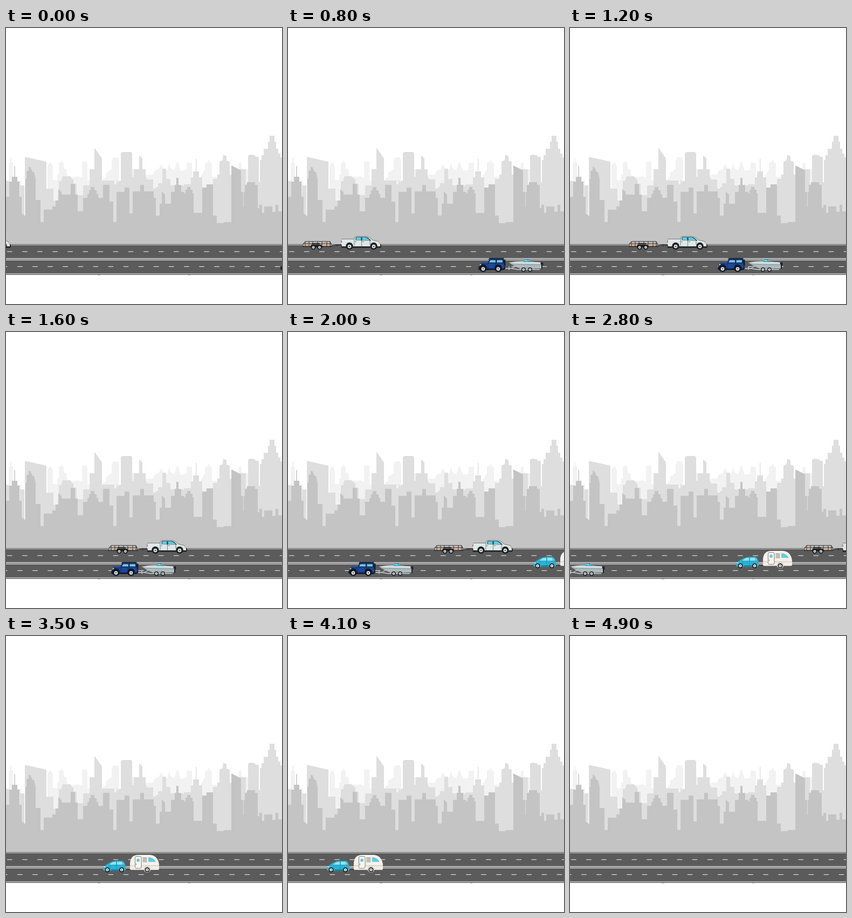
These frames come from a looping animation (512 px wide and 512 px high, 5 s). An HTML page with a canvas:

```html
<!DOCTYPE html>
<html lang="en">
<head>
<meta charset="utf-8">
<title>City traffic</title>
<style>
html, body { margin: 0; width: 100%; height: 100%; overflow: hidden; background: #fff; }
canvas { display: block; width: 100vmin; height: 100vmin; }
</style>
</head>
<body>
<canvas id="stage" width="512" height="512"></canvas>
<script>
const ctx = document.getElementById('stage').getContext('2d');
const LOOP = 5000, STEP = 100;

function fill(color, d) {
  ctx.fillStyle = color;
  ctx.fill(new Path2D(d));
}
function stroke(color, width, d) {
  ctx.strokeStyle = color;
  ctx.lineWidth = width;
  ctx.stroke(new Path2D(d));
}
function rect(color, x, y, w, h) {
  ctx.fillStyle = color;
  ctx.fillRect(x, y, w, h);
}
function disc(color, x, y, r) {
  ctx.fillStyle = color;
  ctx.beginPath();
  ctx.arc(x, y, r, 0, Math.PI * 2);
  ctx.fill();
}
function wheel(x, y, r, rim = '#e4e8ea', hub = '#555c61') {
  disc('#15191c', x, y, r);
  disc(rim, x, y, r * 0.62);
  disc(hub, x, y, r * 0.25);
}

// City outlines, from the back layer to the front one
const far = ['M0 401V283H5V250H7.5V241H10V249H13V283H28V401Z',
  'M77 401V256L81 250H84L87 258V282H95V272H98V250H101L103 245 105 250H107V260L112 262 114 276H131L134 275 141 278V248H151V283H156V401Z',
  'M178 401V283L186 275V268L196 262V246L199 240H207L210 246V283H234V262H238V272H273L275 265 283 262 288 252 291 260 299 264 303 250 305 260 312 264 318 246 322 258 324 265 335 263V250H345V401Z',
  'M362 401V275L369 262V250L374 249 376 243 379 250 382 251V276H393V401ZM418 401V262H431L432 250H436L438 262H449V401Z'];
const mid = ['M0 401V284H6V401ZM26 401V292H34V349H35V239L75 248V298H88V320H98V284H102L105 275H119L122 280 125 281V289H131V310H143V292H155V262H164V222L178 242V283H201V290H205V281L209 287V284H213V233L216 230H232L234 233V276H237V262H247V236L253 242V262H259V276L262 281H273V298H278V295H282V288H290V261H297V280H305V292H330V401Z',
  'M330 401V290H343V277H347V266H352V243H353.4V266H358V277H364V296H384V280H392V272H396V248L402 245 403 235 409 238V246L415 248V272H418V401Z',
  'M434 401V262H445V290H449V237L453 235 462 236 463 239H469V286H471V245H474V236H478V224H486V211H489V200H498V211H501V224H505V233H509V240H512V401Z'];
const near = ['M0 401V313H6V285H11V276H15.3V256H16.8V276H21V285H25V313H29V344L36 349V280H38V265H41.500L42.500 257 46 259 49 267H52L55 280V319H64V360H70V337H86V331H92V320H97V299L103 304V309H120V289H128V309H133V340H143V315H151V308H154V301H157V295H164V301H168V308H171V315H180V291H192V322H199V360H205V304H220V296H229V344H235V401Z',
  'M235 401V303H249V291H256V303H274V315H278V348H285V326H289V303L295 309V326H306V304H313V291H316V278H320V291H325V304H331V307H333V300H336V295H342V300H346V307H348V343H364V296H372V290H384V348H391V362H404V360H418V255L436 264V304H440V332H441V305H443V291H447V286H462V291H467V334H470V328H475V343H479V331H494V341H500V328H505V340H512V401Z'];

function city() {
  far.forEach(d => fill('#f2f2f2', d));
  mid.forEach(d => fill('#dedede', d));
  near.forEach(d => fill('#c4c4c4', d));
}

function lane(y, h, dashX, dashY) {
  rect('#5b5b5b', 0, y, 512, h);
  for (let x = dashX; x < 512; x += 28.1) rect('#e8e8e8', x, dashY, 9.5, 1.1);
}
function road() {
  rect('#fff', 0, 401, 512, 57);
  rect('#5b5b5b', 0, 401, 512, 1.3);
  lane(403, 24, 2, 414.3);
  rect('#5b5b5b', 0, 428, 512, 1.6);
  lane(430.8, 24.7, -7, 442);
  rect('#5b5b5b', 0, 456.5, 512, 1.5);
  rect('#8a8a8a', 170, 458, 5, 0.5);
  rect('#8a8a8a', 338, 458, 4, 0.5);
}

function truck() {
  // flat trailer
  rect('#d8b499', 3, 400, 50, 5);
  stroke('#34302e', 1, 'M1 402L6 396H52L55 402M6 396V405M13 396V405M20 396V405M29 396V405M37 396V405M46 396V405M52 396V405M2 400H54');
  rect('#292a2b', 1, 404.5, 54, 1.6);
  rect('#292a2b', 18, 399, 15, 2.5);
  fill('#222', 'M15 407L17 402H36L39 407Z');
  wheel(21, 407, 4);
  wheel(32.5, 407, 4);
  stroke('#303437', 1.4, 'M55 404L64 402.500H75M65 401V405');
  // pickup
  fill('#252b2e', 'M72 401H146L147.500 404 146 408H73Z');
  fill('#dfe8e8', 'M73 393L74 391.500H97L98 388 100 386.700H118Q124 387 131 393.500L142 396 145 401V405H74L73 401Z');
  stroke('#4a5255', 0.7, 'M73 393L74 391.500H97L98 388 100 386.700H118Q124 387 131 393.500L142 396 145 401M97 392V404M110.500 388V405M126 394V402');
  fill('#273238', 'M99.500 394V389L101 387.700H118Q122 388 128.500 394.500Z');
  fill('#62cce4', 'M100.500 393.700V389.500L102 388.500H109.500V393.700ZM111.500 393.700V388.500H117Q121 389 126 394Z');
  rect('#535d60', 98, 396, 3, 0.8);
  rect('#535d60', 112, 396, 3, 0.8);
  rect('#c04b43', 72.5, 394, 1.3, 4);
  rect('#f3d38b', 141, 398, 3, 2);
  disc('#202629', 88, 404.5, 6.7);
  disc('#202629', 133, 404.5, 6.7);
  wheel(88, 405.2, 5.5);
  wheel(133, 405.2, 5.5);
}

function jeep() {
  // boat and its trailer
  stroke('#cbd3d6', 1.3, 'M50 446H62L73 448H114M57 442V449M62 446L69 442');
  fill('#aebbbf', 'M57 435Q70 432 84 432.500L119 435 118 446 79 446.500Q67 443 57 435Z');
  fill('#d2dcde', 'M57 435Q70 432 84 432.500L119 435 118.500 438 66 437.500Z');
  stroke('#718083', 0.7, 'M60 438L118 439.500M57 435Q70 432 84 432.500');
  fill('#35a9bd', 'M83 432.500L90 428.500 92 429 98 434H85Z');
  fill('#80dce7', 'M86 432L90 429.500 92 432.500Z');
  fill('#1d2328', 'M115 435L120 434.500 120.500 439 119 441V447H117V440Z');
  fill('#9caaae', 'M77 447Q80 442 90 443.500 98 442 103 447Z');
  wheel(84, 448.2, 4);
  wheel(96, 448.2, 4);
  // off-roader
  rect('#171c24', 47, 430, 3.5, 11);
  fill('#121d34', 'M1 442H50V447L47 449H2L0 447Z');
  fill('#1d489b', 'M2 446L3 437 6 435H17L21 428H47L48 446Z');
  fill('#14264b', 'M19 428.500L21 426.800H47L48 429.500H19Z');
  fill('#142846', 'M18 435.500L21 429.500H47V436H18Z');
  fill('#75bee2', 'M20 435L22.500 430.500H32V435ZM34.500 430.500H45V435H34.500Z');
  stroke('#102956', 0.8, 'M18 436H47M18 436V446M33 430V446M4 438H17');
  rect('#14264b', 29, 438, 3, 0.8);
  disc('#f0cf75', 4, 439, 1.3);
  disc('#10182a', 9, 445.5, 7);
  disc('#10182a', 37, 445.5, 7);
  wheel(9, 446.8, 5.4);
  wheel(37, 446.8, 5.4);
}

function caravan() {
  rect('#3c4247', 40, 432.4, 13, 1.7);
  // hatchback
  fill('#27b4d6', 'M0 433Q0 428 5 425L13 420Q18 417.300 25 417.300H36Q39 418 41 424L42 430V434L40 435.500H2Z');
  fill('#91e5f3', 'M11 424.500L17 420Q20 418.800 24 418.700V424.500ZM26 418.700H35Q37.500 419.500 38.500 424.500H26Z');
  stroke('#168eaf', 0.7, 'M11 425H39M25 418V433M13 425V433M36 418V425');
  rect('#147f9d', 15, 433, 19, 2.2);
  rect('#e4f7f8', 1.5, 427.5, 3, 1.5);
  rect('#d65a52', 39.8, 425, 1.5, 3);
  wheel(8, 433.8, 4.5, '#f1f1ee');
  wheel(34.5, 433.8, 4.5, '#f1f1ee');
  // trailer home
  fill('#f5f1eb', 'M50 431V421Q51 406 66 406H87Q101 407 104 423V431Q104 434 101 434H53Q50 434 50 431Z');
  fill('#dfd8ce', 'M50 425H104V431Q104 434 101 434H53Q50 434 50 431Z');
  fill('#f1ede6', 'M50 427H104V431Q104 433 101 433H53Q50 433 50 431Z');
  ctx.fillStyle = '#faf7f2';
  ctx.strokeStyle = '#87776d';
  ctx.lineWidth = 1;
  ctx.beginPath();
  ctx.roundRect(59.5, 409, 11.5, 22, 2.5);
  ctx.fill();
  ctx.stroke();
  disc('#62cce4', 65, 416, 3);
  rect('#87776d', 61, 422, 1, 3);
  for (let y = 411; y < 420; y += 2.4) rect('#8c8077', 73.5, y, 8, 1.1);
  fill('#62cde1', 'M84 410.500Q94 410.500 98 419H84Z');
  disc('#ded6cb', 82, 432.5, 6.4);
  wheel(82, 433.8, 4.5, '#f1f1ee');
}

// Each rig: drawing, first and last moment, and [time, left edge] stops
const rigs = [
  { draw: truck, from: 0, to: 3300, path: [[0, -138], [800, 26], [1600, 189], [2300, 331], [3300, 534]] },
  { draw: jeep, from: 0, to: 3000, path: [[0, 509], [800, 353], [1600, 195], [2300, 49], [3000, -98]] },
  { draw: caravan, from: 1600, to: 4900, path: [[1600, 511], [1700, 509], [2300, 400], [3500, 180], [4900, -73]] }
];

function along(path, t) {
  let i = 1;
  while (i < path.length - 1 && t > path[i][0]) i++;
  const [t0, x0] = path[i - 1], [t1, x1] = path[i];
  return x0 + (x1 - x0) * (t - t0) / (t1 - t0);
}

function render(t) {
  rect('#fff', 0, 0, 512, 512);
  city();
  road();
  for (const { draw, from, to, path } of rigs) {
    if (t < from || t >= to) continue;
    ctx.save();
    ctx.translate(Math.round(along(path, t)), 0);
    draw();
    ctx.restore();
  }
}

const start = performance.now();
function tick() {
  const t = (performance.now() - start) % LOOP;
  render(Math.floor(t / STEP) * STEP);
  requestAnimationFrame(tick);
}
tick();
</script>
</body>
</html>
```
